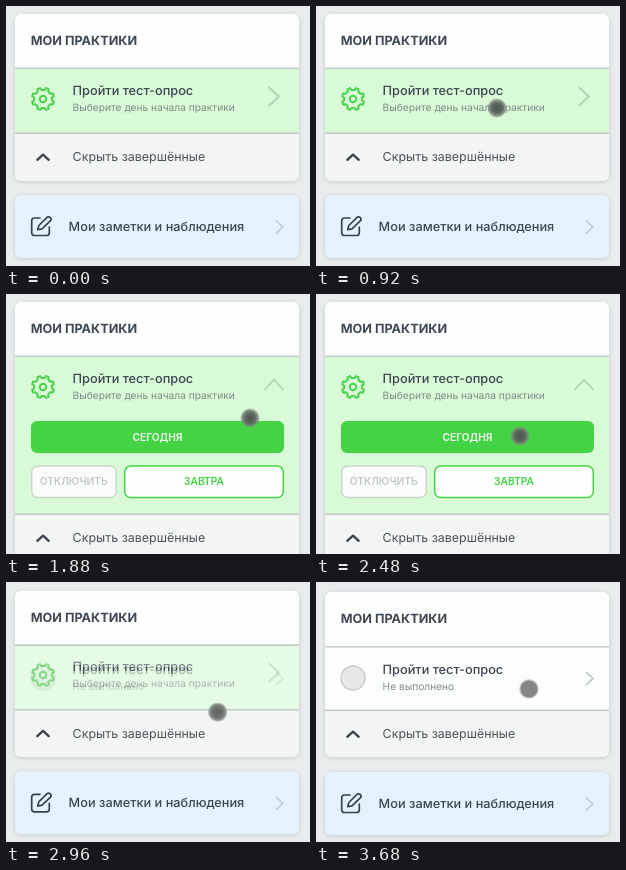
Recreate the animation shown at these times as an HTML page. Size 304 by 260 pixels, loop 4 s.

```html
<!DOCTYPE html>
<html lang="ru">
<head>
<meta charset="utf-8">
<title>Мои практики</title>
<style>
html, body { margin: 0; width: 100%; height: 100%; overflow: hidden; background: #e9eced; }
svg { display: block; width: 304px; height: 260px; font-family: Inter, sans-serif; }
.shadow { filter: drop-shadow(0 1px 2px rgba(30, 45, 55, .18)); }
.line { stroke: #c3c9c9; stroke-width: 1.5; }
.icon { fill: none; stroke: #3a434a; stroke-width: 2; stroke-linecap: round; stroke-linejoin: round; }
.arrow { fill: none; stroke-width: 1.7; stroke-linecap: round; stroke-linejoin: round; }
.text { font-size: 12.75px; font-weight: 500; fill: #3c4650; text-rendering: geometricPrecision; }
.title { font-weight: 700; font-size: 12.7px; fill: #3d4853; }
.soft { font-size: 12.45px; font-weight: 400; fill: #4a535a; }
.sub { font-size: 10.2px; fill: #7e8b86; text-rendering: geometricPrecision; }
.btn { font-size: 10.2px; font-weight: 600; text-anchor: middle; }
</style>
</head>
<body>
<svg viewBox="0 0 304 260">
  <defs>
    <clipPath id="card"><rect id="cardClip" x="9" y="8" width="284" rx="6"/></clipPath>
    <clipPath id="panel"><rect id="panelClip" x="9" y="62" width="284"/></clipPath>
    <radialGradient id="dot">
      <stop offset="0" stop-color="#4c524e"/>
      <stop offset=".55" stop-color="#5c645e" stop-opacity=".95"/>
      <stop offset=".82" stop-color="#788279" stop-opacity=".75"/>
      <stop offset="1" stop-color="#8c978e" stop-opacity=".1"/>
    </radialGradient>
  </defs>
  <rect width="304" height="260" fill="#e9eced"/>

  <rect id="cardBack" class="shadow" x="9" y="8" width="284" rx="6" fill="#fdfefe"/>
  <g clip-path="url(#card)">
    <g id="open" clip-path="url(#panel)">
      <rect x="9" y="62" width="284" height="170" fill="#d9fad7"/>
      <path id="gear" class="icon" style="stroke:#49d24c"/>
      <circle class="icon" style="stroke:#49d24c" cx="37" cy="93" r="3.2"/>
      <text class="text" x="66.6" y="89.3">Пройти тест-опрос</text>
      <text class="sub" x="66.6" y="105.3">Выберите день начала практики</text>
      <path id="toggle" class="arrow" stroke="#afd0b2" d="M-5 -9L5 0L-5 9"/>
      <rect x="25" y="127" width="253" height="32" rx="6" fill="#43d345"/>
      <text class="btn" x="151.5" y="146.5" fill="#f4fff3">СЕГОДНЯ</text>
      <rect x="25.7" y="172" width="84.6" height="31.5" rx="6" fill="#fafcfa" stroke="#cbd5ca" stroke-width="1.5"/>
      <text class="btn" x="67.8" y="191" fill="#c3c8c4">ОТКЛЮЧИТЬ</text>
      <rect x="118.7" y="172" width="158.6" height="31.5" rx="6" fill="#fdfffd" stroke="#43d345" stroke-width="1.5"/>
      <text class="btn" x="198" y="191" fill="#43d345">ЗАВТРА</text>
    </g>
    <g id="done">
      <rect x="9" y="64" width="284" height="64" fill="#fcfdfd"/>
      <circle cx="37" cy="96" r="12" fill="#e6e8e8" stroke="#c8cbcc" stroke-width="1.5"/>
      <text class="text" x="66.6" y="91.5">Пройти тест-опрос</text>
      <text class="sub" x="66.6" y="108">Не выполнено</text>
      <path class="arrow" stroke="#bcc2c6" d="M270.5 90.5L277 96.5L270.5 102.5"/>
    </g>
    <g id="foot">
      <rect x="9" y="127" width="284" height="50" fill="#f3f4f4"/>
      <path class="line" d="M9 127.3H293"/>
      <path class="icon" d="M31.3 153.8L37 148.6L42.7 153.8" style="stroke-width:2.3"/>
      <text class="text soft" x="66.6" y="155.2">Скрыть завершённые</text>
    </g>
    <g id="head">
      <path class="line" d="M9 62.3H293"/>
      <text class="text title" x="24.7" y="39">МОИ ПРАКТИКИ</text>
    </g>
  </g>

  <g id="notes">
    <rect class="shadow" x="9" y="189" width="284" height="63" rx="6" fill="#e3f2fc"/>
    <path class="icon" d="M34 212H28.5Q25.7 212 25.7 214.8V226.7Q25.7 229.5 28.5 229.5H40.5Q43.3 229.5 43.3 226.7V221M41.3 211.1Q42.8 210.2 44.4 211.7Q45.8 213.3 44.5 214.7L36 222.8L31.8 223.7L32.8 219.5Z" style="stroke-width:1.7"/>
    <text class="text" x="62.6" y="225">Мои заметки и наблюдения</text>
    <path class="arrow" stroke="#bccbd5" d="M270.3 214.8L276.8 221L270.3 227.2" style="stroke-width:1.5"/>
  </g>

  <g id="cursor">
    <circle r="10" fill="url(#dot)"/>
    <circle id="flat" r="9" fill="#858686" stroke="#c2c4c4"/>
  </g>
</svg>
<script>
const LOOP = 4000, STEP = 40, GROW = 93;
const $ = id => document.getElementById(id);
const set = (id, name, value) => $(id).setAttribute(name, value);
const move = (id, x, y, more = '') => set(id, 'transform', `translate(${x} ${y}) ${more}`);
const ramp = (t, a, b) => Math.min(1, Math.max(0, (t - a) / (b - a)));
const smooth = p => p * p * (3 - 2 * p);
const easeOut = p => 1 - (1 - p) ** 2;

// time, x, y
const path = [
  [600, 174, 107], [920, 181, 102], [1140, 184, 102], [1400, 226, 102],
  [1880, 244, 124], [2240, 205, 142], [2720, 203, 142],
  [3280, 225, 112], [3680, 213, 107]
];

function cursorAt(t) {
  const i = path.findIndex(k => k[0] > t);
  if (i < 0) return path[path.length - 1].slice(1);
  if (i === 0) return path[0].slice(1);
  const [t0, x0, y0] = path[i - 1], [t1, x1, y1] = path[i];
  const p = smooth(ramp(t, t0, t1));
  return [x0 + (x1 - x0) * p, y0 + (y1 - y0) * p];
}

function gearPath(cx, cy) {
  const teeth = 8, points = [];
  for (let i = 0; i < teeth; i++) {
    for (const [off, r] of [[.21, 9], [.34, 11.3], [.66, 11.3], [.79, 9]]) {
      const a = (i + off) / teeth * Math.PI * 2;
      points.push((cx + r * Math.sin(a)).toFixed(2) + ' ' + (cy - r * Math.cos(a)).toFixed(2));
    }
  }
  return 'M' + points.join('L') + 'Z';
}

function draw(t) {
  const opened = easeOut(ramp(t, 1140, 1400)), closed = easeOut(ramp(t, 2550, 2840));
  const h = GROW * (opened - closed);
  const swap = smooth(ramp(t, 2880, 3080));
  const top = 8 + 2 * swap;

  for (const id of ['cardBack', 'cardClip']) {
    set(id, 'y', top);
    set(id, 'height', 175 + h - top);
  }
  set('panelClip', 'height', 65 + h);
  move('head', 0, 2.4 * swap);
  move('foot', 0, h + swap);
  move('notes', 0, h + swap);
  set('done', 'opacity', swap);
  set('open', 'opacity', 1 - smooth(ramp(t, 3040, 3120)));

  const turn = smooth(ramp(t, 1160, 1440)) - smooth(ramp(t, 2520, 2720));
  move('toggle', 268, 90.5, `rotate(${-90 * turn})`);

  const [x, y] = cursorAt(t);
  move('cursor', x, y);
  set('cursor', 'opacity', ramp(t, 600, 760));
  set('flat', 'opacity', swap);
}

set('gear', 'd', gearPath(37, 93));
const start = performance.now();
function tick() {
  const t = (performance.now() - start) % LOOP;
  draw(Math.floor(t / STEP) * STEP);
  requestAnimationFrame(tick);
}
tick();
</script>
</body>
</html>
```
